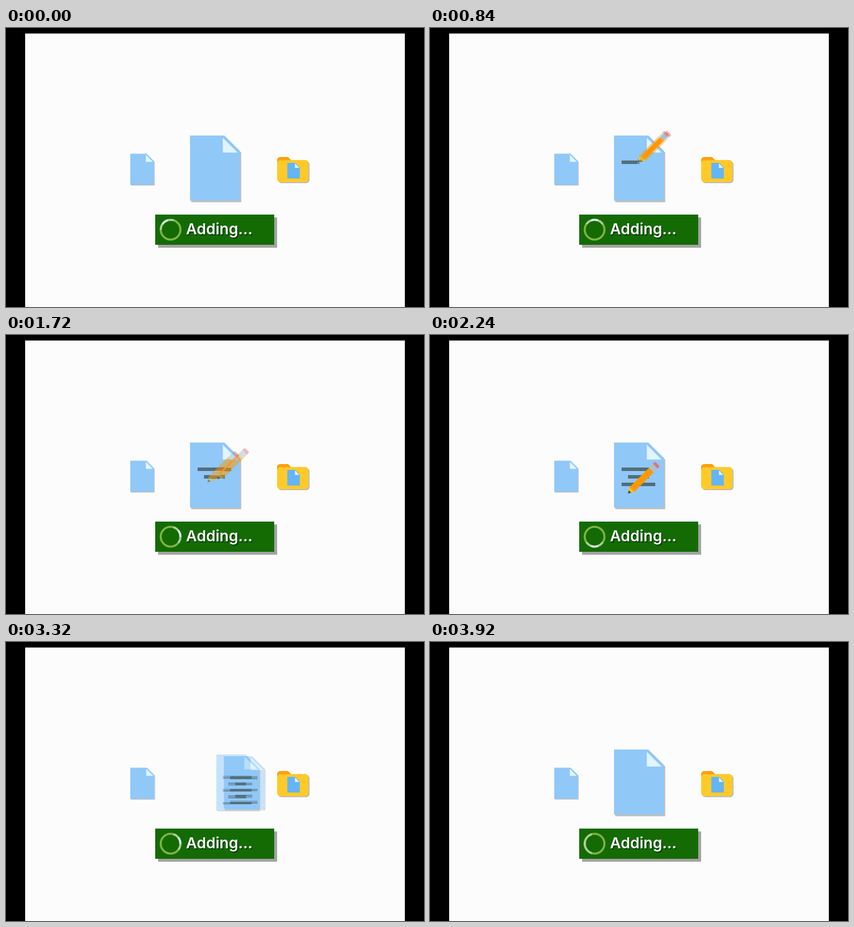
These frames come from a looping animation (720x480 px, 3.96 s). An HTML page with a canvas:

```html
<!DOCTYPE html>
<html lang="en">
<head>
<meta charset="utf-8">
<title>Adding</title>
<style>
  html, body { margin: 0; width: 100%; height: 100%; overflow: hidden; background: #000; }
  svg, canvas { position: absolute; left: 0; top: 0; width: 720px; height: 480px; }
  text { font: 600 26px Inter, "Open Sans", sans-serif; }
</style>
</head>
<body>
<svg viewBox="0 0 720 480">
  <rect x="33" y="9.5" width="654" height="471" fill="#fcfcfc"/>

  <g transform="translate(461.6 211.2) scale(1.35)">
    <path fill="#bdbab6" transform="translate(1.3 1.3)" d="M40 12H8c-2.200 0-4 1.800-4 4v20c0 2.200 1.800 4 4 4h32c2.200 0 4-1.800 4-4V16c0-2.200-1.800-4-4-4z"/>
    <path fill="#ff9f0a" d="M40 12H22l-4-4H8c-2.200 0-4 1.800-4 4v8h40v-4c0-2.200-1.800-4-4-4z"/>
    <path fill="#ffca28" d="M40 12H8c-2.200 0-4 1.800-4 4v20c0 2.200 1.800 4 4 4h32c2.200 0 4-1.800 4-4V16c0-2.200-1.800-4-4-4z"/>
    <path fill="#64b5f6" d="M17 15.400h10l6 6v14H17z"/>
    <path fill="#e1f5fe" d="M26.800 16.200v5.600h5.600z"/>
  </g>

  <rect x="262" y="326" width="205" height="52" fill="#a3a3a3"/>
  <rect x="257" y="321" width="205" height="52" fill="#146b04"/>
  <text x="311.500" y="356.500" fill="#0a3a04">Adding...</text>
  <text x="310" y="355" fill="#fff">Adding...</text>
</svg>
<canvas id="stage" width="720" height="480"></canvas>

<script>
const LOOP = 3960, STEP = 40;
const ctx = document.getElementById('stage').getContext('2d');

// Icon shapes on a 48-unit grid
const sheet = new Path2D('M40 45H8V3h22l10 10z');
const fold = new Path2D('M38.5 14H29V4.5z');
const pencil = [
  ['#e57373', 'M42.58 9.07 38.93 5.42c-.55-.56-1.46-.56-2.01 0L35.2 7.14l5.66 5.66 1.72-1.72c.56-.55.56-1.46 0-2.01z'],
  ['#ff9800', 'M36 17.66 12.57 41.09 6.9 35.43 30.34 12z'],
  ['#b0bec5', 'M35.2 7.14l5.66 5.66L36 17.66 30.34 12z'],
  ['#ffc107', 'M6.9 35.43 5 43l7.57-1.91z'],
  ['#37474f', 'M5.97 39.17 5 43l3.83-.97z']
].map(([color, d]) => [color, new Path2D(d)]);

// Text rows: writing start and end, with indented even rows
const rows = [[590, 1125], [1290, 1690], [1800, 2100], [2230 + 50, 2460], [2600, 2870]]
  .map(([from, to], i) => ({
    from, to,
    x0: i % 2 ? 341 : 330,
    x1: i % 2 ? 377 : 388,
    top: 228 + 13 * i,
    tip: 231 + 13.9 * i
  }));

const penKeys = [[244, 383, 287]];
rows.forEach((r, i) => {
  if (i === 3) penKeys.push([2225, r.x0, r.tip]);
  penKeys.push([r.from, r.x0, r.tip], [r.to, i === 4 ? 383 : r.x1, r.tip]);
});

const ramp = (t, a, b) => Math.min(1, Math.max(0, (t - a) / (b - a)));
const mix = (a, b, p) => a + (b - a) * p;

// Constant speed with a short smooth start and stop
function glide(p, a = 0.2) {
  const k = 2 * a * (1 - a);
  if (p < a) return p * p / k;
  if (p > 1 - a) return 1 - (1 - p) ** 2 / k;
  return (p - a / 2) / (1 - a);
}

function penAt(t) {
  const i = penKeys.findIndex(k => k[0] > t);
  if (i === 0) return penKeys[0].slice(1);
  if (i < 0) return penKeys[penKeys.length - 1].slice(1);
  const a = penKeys[i - 1], b = penKeys[i], p = ramp(t, a[0], b[0]);
  return [mix(a[1], b[1], p), mix(a[2], b[2], p)];
}

function shape(path, color, dx = 0, dy = dx) {
  ctx.save();
  ctx.translate(dx, dy);
  ctx.fillStyle = color;
  ctx.fill(path);
  ctx.restore();
}

function drawDoc(x, y, size, time = -1) {
  ctx.save();
  ctx.translate(x, y);
  ctx.scale(size, size);
  ctx.save();
  ctx.scale(2.69, 2.67);
  ctx.translate(-24, -24);
  shape(sheet, '#c2beba', 0.8, 1);
  shape(sheet, '#90c8f8');
  shape(fold, '#e1f5fe');
  ctx.restore();
  ctx.fillStyle = '#546e7a';
  for (const r of rows) {
    const w = (r.x1 - r.x0) * ramp(time, r.from, r.to);
    if (w) ctx.fillRect(r.x0 - 360, r.top - 241, w, 6);
  }
  ctx.restore();
}

function drawPencil(t) {
  const alpha = ramp(t, 160, 240) * (1 - ramp(t, 2930, 3050));
  if (!alpha) return;
  ctx.save();
  ctx.globalAlpha = alpha;
  ctx.translate(...penAt(t));
  ctx.scale(1.42, 1.42);
  ctx.translate(-5, -43);
  for (const [color, path] of pencil) shape(path, color);
  ctx.restore();
}

function drawSpinner(t) {
  const ring = (color, from, to) => {
    ctx.strokeStyle = color;
    ctx.beginPath();
    ctx.arc(283.5, 347, 17, from, to);
    ctx.stroke();
  };
  const mid = (216 + t * 0.9) * Math.PI / 180, half = 0.66;
  ctx.lineWidth = 3.6;
  ring('#7db343', 0, 7);
  ring('#d9e8ee', mid - half, mid + half);
}

function drawScene(t) {
  ctx.clearRect(0, 0, 720, 480);
  drawDoc(234.5, 243, 0.475);
  if (t < 3725) {
    const p = glide(ramp(t, 3121, 3721));
    ctx.globalAlpha = 1 - ramp(t, 3640, 3720);
    drawDoc(mix(360, 495, p), mix(241, 243, p), mix(1, 0.5, p), t);
    ctx.globalAlpha = 1;
  }
  if (t > 3330) {
    const p = glide(ramp(t, 3330, 3890));
    drawDoc(mix(234.5, 360, p), mix(243, 241, p), mix(0.475, 1, p));
  }
  drawPencil(t);
  drawSpinner(t);
}

// Interlaced picture: odd lines run one step ahead
const oddLines = new Path2D();
for (let y = 1; y < 480; y += 2) oddLines.rect(0, y, 720, 1);

function render() {
  const t = Math.floor(performance.now() % LOOP / STEP) * STEP;
  drawScene(t);
  ctx.save();
  ctx.clip(oddLines);
  drawScene((t + STEP) % LOOP);
  ctx.restore();
  requestAnimationFrame(render);
}
render();
</script>
</body>
</html>
```
